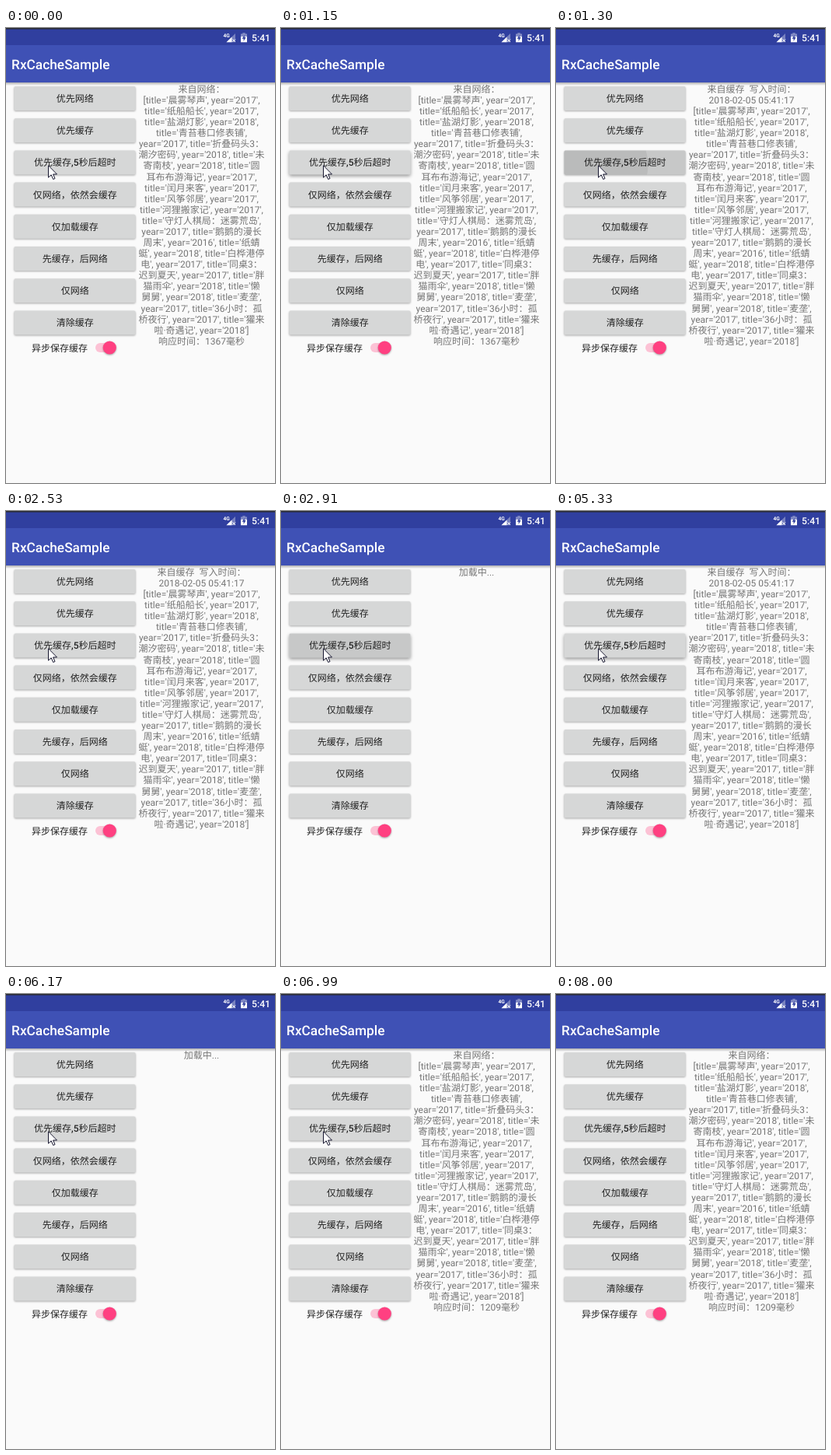
Write an HTML page that moves like this. It is 346 px wide and 585 px high and loops after 8.28 s.

```html
<!DOCTYPE html>
<html lang="zh-CN">
<head>
<meta charset="utf-8">
<title>RxCacheSample</title>
<style>
html, body { margin: 0; width: 100%; height: 100%; overflow: hidden; background: #fafafa; }
svg { display: block; width: 346px; height: 585px; }
text { font: 12px Roboto, "Noto Sans CJK SC", sans-serif; text-rendering: geometricPrecision; white-space: pre; }
.mid { text-anchor: middle; }
.label { fill: #212121; }
.result { fill: #757575; }
.medium, .bar { font-weight: 500; }
.bar { fill: #fff; }
.button { fill: #d6d7d7; filter: drop-shadow(0 1px .8px rgba(0,0,0,.32)); }

#target, #ripple, #press, #net, #cache, #load, #first, #second, #cursor {
  animation: 8280ms step-end infinite;
}
#target { animation-name: lift; }
#ripple { animation-name: ripple; }
#press { animation-name: press; }
#net { animation-name: net; }
#cache { animation-name: cache; }
#load { animation-name: load; }
#first { animation-name: first; }
#second { animation-name: second; }
#cursor { animation-name: cursor; }

@keyframes lift {
  0%, 15.7%, 36.594%, 54.83%, 70.893%, 100% { filter: drop-shadow(0 1px .8px rgba(0,0,0,.32)); }
  30.555% { filter: drop-shadow(0 1.5px 1.3px rgba(0,0,0,.36)); }
  13.888%, 32.246%, 50.12%, 64.371% { filter: drop-shadow(0 2px 2px rgba(0,0,0,.4)); }
}
@keyframes ripple {
  0%, 19.082%, 39.855%, 59.541%, 74.516%, 100% { opacity: 0; }
  15.7%, 36.594%, 54.83%, 70.893% { opacity: 1; }
}
@keyframes press {
  0%, 36.594%, 100% { opacity: 0; }
  35.144% { opacity: 1; }
}
@keyframes net {
  0%, 84.42%, 100% { opacity: 1; }
  15.7% { opacity: 0; }
}
@keyframes cache {
  0%, 35.144%, 70.893%, 100% { opacity: 0; }
  15.7%, 36.594% { opacity: 1; }
}
@keyframes load {
  0%, 36.594%, 84.42%, 100% { opacity: 0; }
  35.144%, 70.893% { opacity: 1; }
}
@keyframes first {
  0%, 100% { opacity: 1; }
  15.7% { opacity: 0; }
}
@keyframes second {
  0%, 100% { opacity: 0; }
  84.42% { opacity: 1; }
}
@keyframes cursor {
  0%, 100% { transform: translate(54px, 176px); opacity: 1; }
  92.995% { transform: translate(77px, 216px); opacity: 1; }
  94.806% { transform: translate(301px, 530px); opacity: 1; }
  96.618% { transform: translate(301px, 530px); opacity: 0; }
}
</style>
</head>
<body>
<svg viewBox="0 0 346 585">
  <defs>
    <linearGradient id="shade" x2="0" y2="1">
      <stop stop-opacity=".3"/>
      <stop offset="1" stop-opacity="0"/>
    </linearGradient>
    <clipPath id="face"><rect x="10.5" y="157.4" width="156" height="31" rx="1.7"/></clipPath>
  </defs>

  <rect width="346" height="585" fill="#fafafa"/>
  <rect y="70" width="346" height="4" fill="url(#shade)"/>
  <rect y="22" width="346" height="48" fill="#3f51b5"/>
  <rect width="346" height="22" fill="#303f9f"/>
  <rect width="346" height="1.6" fill="#2b2d35"/>

  <g fill="#fff">
    <text class="bar" x="279.5" y="11.5" style="font-size:6.6px;font-weight:700">4G</text>
    <path d="M295 7V18.3H283.5Z" opacity=".35"/>
    <path d="M290.5 11.5V18.3H283.5Z"/>
    <path d="M291.5 14.5l3.5 3.5m0-3.5l-3.5 3.5" stroke="#fff"/>
    <path d="M304.3 6.2h3.4v1.3h2.3v3.5h-8V7.5h2.3Z" opacity=".4"/>
    <path d="M302 11h8v7.3h-8Z"/>
    <path d="M306.8 9l-3.1 4.7h1.9v3.2l3-4.8h-1.8Z" fill="#303f9f"/>
    <text class="bar" x="316" y="17" style="font-size:12.2px">5:41</text>
  </g>
  <text class="bar" x="7.1" y="52.8" style="font-size:17.3px">RxCacheSample</text>

  <g id="buttons"></g>
  <g clip-path="url(#face)">
    <g id="ripple" fill-opacity=".065">
      <rect x="10" y="157" width="157" height="32"/>
      <circle cx="54" cy="176" r="64.5"/>
    </g>
    <rect id="press" x="10" y="157" width="157" height="32" fill-opacity=".065"/>
  </g>
  <g id="labels"></g>

  <text class="label" x="33" y="415.7">异步保存缓存</text>
  <rect x="115" y="405" width="24" height="12" rx="6" fill="#fcc2d5"/>
  <circle cx="133.3" cy="411" r="8.6" fill="#ff4081" style="filter:drop-shadow(0 1px 1px rgba(0,0,0,.35))"/>

  <g id="net"></g>
  <g id="cache"></g>
  <g id="load"></g>

  <path id="cursor" d="M.5.8V16.2L4.2 12.8 6.7 18.5 9 17.5 6.6 12H11.5Z" fill="#fff" stroke="#15152e"/>
</svg>
<script>
const labels = ['优先网络', '优先缓存', '优先缓存<tspan class="medium">,5</tspan>秒后超时',
  '仅网络，依然会缓存', '仅加载缓存', '先缓存，后网络', '仅网络', '清除缓存'];

const films = `[title='晨雾琴声', year='2017',
title='纸船船长', year='2017',
title='盐湖灯影', year='2018',
title='青苔巷口修表铺',
year='2017', title='折叠码头3：
潮汐密码', year='2018', title='未
寄南枝', year='2018', title='圆
耳布布游海记', year='2017',
title='闰月来客', year='2017',
title='风筝邻居', year='2017',
title='河狸搬家记', year='2017',
title='守灯人棋局：迷雾荒岛',
year='2017', title='鹅鹅的漫长
周末', year='2016', title='纸蜻
蜓', year='2018', title='白桦港停
电', year='2017', title='同桌3：
迟到夏天', year='2017', title='胖
猫雨伞', year='2018', title='懒
舅舅', year='2018', title='麦垄',
year='2017', title='36小时：孤
桥夜行', year='2017', title='獾来
啦·奇遇记', year='2018']`.split('\n');

const fill = (id, html) => { document.getElementById(id).innerHTML = html; };
const text = (cls, x, y, s, id = '') =>
  `<text class="mid ${cls}" x="${x}" y="${y}"${id && ` id="${id}"`}>${s}</text>`;
const line = (s, row, id) => text('result', 251.5, 82.9 + row * 14.08, s, id);
const block = rows => rows.map((s, i) => line(s, i)).join('');
const rowY = i => 90.5 + i * 41.2;

fill('buttons', labels.map((_, i) =>
  `<rect class="button" x="10.5" y="${rowY(i) - 15.5}" width="156" height="31" rx="1.7"${i === 2 ? ' id="target"' : ''}/>`).join(''));
fill('labels', labels.map((s, i) => text('label', 88.8, rowY(i) + 4.5, s)).join(''));
fill('net', block(['来自网络：', ...films])
  + line('响应时间：1367毫秒', 23, 'first') + line('响应时间：1209毫秒', 23, 'second'));
fill('cache', block(['来自缓存\u00a0\u00a0写入时间：', '2018-02-05 05:41:17', ...films]));
fill('load', line('加载中...', 0));
</script>
</body>
</html>
```
